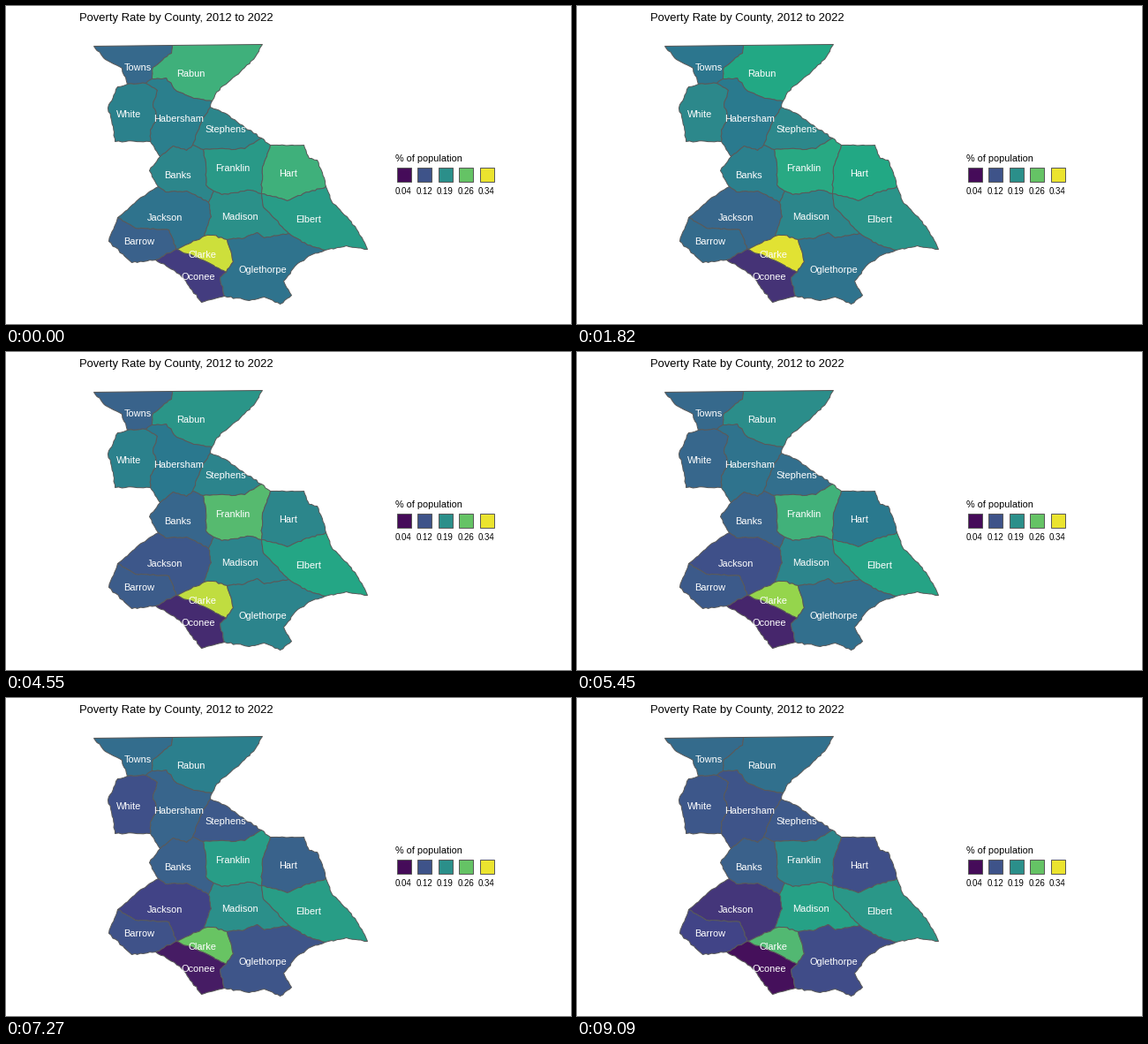
A matplotlib script for the animation above (10 s loop, 640 by 360 pixels).

```python
import numpy as np
import matplotlib.pyplot as plt
from matplotlib.animation import FuncAnimation
from matplotlib.patches import Polygon, Rectangle

W, H, DPI = 640, 360, 100
PX = 72 / DPI
LOOP, FRAMES, YEARS = 10000, 200, 11
EDGE = "#595959"
plt.rcParams["font.family"] = "Liberation Sans"
rng = np.random.default_rng(7)

# Colour scale: six viridis stops blended in Lab space
TO_XYZ = np.array([[.4124, .3576, .1805], [.2126, .7152, .0722], [.0193, .1192, .9505]])
WHITE = TO_XYZ.sum(axis=1)
STOPS = ["#440154", "#414487", "#2A788E", "#22A884", "#7AD151", "#FDE725"]


def to_lab(code):
    c = np.array([int(code[i:i + 2], 16) / 255 for i in (1, 3, 5)])
    lin = np.where(c > .04045, ((c + .055) / 1.055) ** 2.4, c / 12.92)
    t = TO_XYZ @ lin / WHITE
    f = np.where(t > .008856, np.cbrt(t), 7.787 * t + 16 / 116)
    return np.array([116 * f[1] - 16, 500 * (f[0] - f[1]), 200 * (f[1] - f[2])])


LAB = np.array([to_lab(s) for s in STOPS])


def shade(t):
    L, a, b = (np.interp(t, np.linspace(0, 1, 6), col) for col in LAB.T)
    fy = (L + 16) / 116
    f = np.array([fy + a / 500, fy, fy - b / 200])
    xyz = np.where(f > .2069, f ** 3, (f - 16 / 116) / 7.787) * WHITE
    lin = np.clip(np.linalg.solve(TO_XYZ, xyz), 0, 1)
    return np.clip(np.where(lin > .0031308, 1.055 * lin ** (1 / 2.4) - .055, 12.92 * lin), 0, 1)


# Points where borders meet
NODES = dict(
    a=(188, 44), b=(165, 82), c=(158, 87), d=(137, 88), e=(233, 107), f=(231, 114),
    g=(163, 153), h=(174, 170), i=(211, 157), j=(223, 162), k=(289, 149), l=(299, 157),
    m=(289, 212), n=(235, 209), o=(229, 222), p=(172, 204), q=(362, 204), r=(361, 276),
    s=(320, 257), t=(250, 264), u=(224, 260), v=(192, 275), w=(126, 239), x=(169, 287),
    y=(249, 301), z=(247, 328))
borders = {}


def border(sides, ends, *via):
    """Rough line between two nodes; sides are the areas it divides, digits mean outside."""
    pts = np.array([NODES[ends[0]], *via, NODES[ends[1]]], float)
    line = [pts[:1]]
    for p, q in zip(pts, pts[1:]):
        d = np.hypot(*(q - p))
        step = p + (q - p) * np.linspace(0, 1, max(2, round(d / 3.5) + 1))[1:, None]
        if d < 80:  # the long state line stays straight
            step[:-1] += rng.uniform(-.8, .8, step[:-1].shape)
        line.append(step)
    borders[sides] = ends, np.vstack(line)


border("T0", "da", (131, 70), (112, 60), (99, 45))
border("TR", "ab", (187, 53), (166, 69))
border("TH", "bc")
border("TW", "cd")
border("R0", "ae", (290, 43), (282, 57), (265, 74), (238, 97))
border("RH", "be", (181, 81), (193, 96), (212, 104))
border("W0", "dg", (126, 91), (115, 115), (121, 136), (123, 153))
border("WH", "cg", (171, 95), (166, 111), (171, 126), (163, 140))
border("H0", "gh")
border("H1", "ef")
border("HS", "fi", (222, 129))
border("HB", "hi", (189, 158), (204, 163))
border("SB", "ij")
border("S0", "fk", (250, 122), (270, 137))
border("SF", "jk", (270, 161))
border("B0", "hp", (162, 186))
border("BF", "jn", (226, 180), (226, 202))
border("BM", "no")
border("BJ", "po", (180, 210), (204, 209))
border("F0", "kl")
border("FN", "lm", (290, 182))
border("FM", "nm", (244, 213), (276, 208))
border("N0", "lq", (337, 157), (343, 172), (352, 174), (361, 198))
border("NE", "mq", (318, 220), (336, 212))
border("E0", "qr", (368, 220), (395, 249), (409, 275), (385, 271))
border("EM", "ms", (291, 227), (305, 241))
border("EG", "sr", (341, 270))
border("MG", "st", (292, 262), (284, 256), (270, 262))
border("MC", "tu", (234, 259))
border("JM", "ou", (232, 238))
border("JC", "uv", (206, 269))
border("J0", "pw", (150, 218))
border("JA", "wv", (146, 251), (184, 253))
border("A0", "wx", (116, 266), (142, 290))
border("AO", "xv")
border("CO", "vy", (222, 287))
border("CG", "ty", (257, 289))
border("OG", "yz", (242, 307))
border("O0", "xz", (196, 303), (221, 335))
border("G0", "zr", (275, 333), (292, 329), (310, 337), (323, 327), (314, 311),
       (330, 291), (346, 281))


def ring(area):
    todo = [b for sides, b in borders.items() if area in sides]
    (_, tip), pts = todo.pop(0)
    chain = [pts]
    while todo:
        ends, pts = todo.pop(next(i for i, b in enumerate(todo) if tip in b[0]))
        forward = ends[0] == tip
        tip = ends[1] if forward else ends[0]
        chain.append(pts if forward else pts[::-1])
    return np.vstack(chain) + .5


# area: name, label centre, then scale position (%) in the key years
KEY_YEARS = 0, 3, 5, 7, 10
COUNTIES = {
    "T": ("Towns", 149, 69, 34, 42, 32, 36, 35),
    "R": ("Rabun", 209, 76, 64, 58, 52, 46, 37),
    "W": ("White", 139, 122, 44, 48, 44, 23, 27),
    "H": ("Habersham", 196, 127, 43, 40, 40, 36, 26),
    "S": ("Stephens", 249, 139, 46, 47, 45, 28, 28),
    "B": ("Banks", 194, 191, 46, 42, 33, 31, 31),
    "F": ("Franklin", 257, 183, 54, 64, 69, 60, 46),
    "N": ("Hart", 320, 189, 64, 58, 46, 35, 24),
    "J": ("Jackson", 180, 239, 38, 31, 27, 22, 15),
    "M": ("Madison", 265, 238, 50, 44, 45, 46, 57),
    "E": ("Elbert", 343, 241, 55, 50, 59, 57, 53),
    "A": ("Barrow", 151, 266, 31, 37, 29, 28, 20),
    "C": ("Clarke", 222, 281, 92, 97, 90, 77, 68),
    "O": ("Oconee", 218, 306, 17, 12, 11, 8, 3),
    "G": ("Oglethorpe", 291, 298, 38, 38, 45, 28, 23),
}

fig = plt.figure(figsize=(W / DPI, H / DPI), dpi=DPI, facecolor="white")
ax = fig.add_axes([0, 0, 1, 1])
ax.set_xlim(0, W)
ax.set_ylim(H, 0)
ax.axis("off")


def label(x, y, s, px, color="black", ha="center"):
    ax.text(x, y, s, size=px * PX, color=color, ha=ha, va="baseline", zorder=5)


shapes = {}
for area, (name, x, y, *rates) in COUNTIES.items():
    shape = ax.add_patch(Polygon(ring(area), closed=True, ec=EDGE, lw=PX))
    shapes[shape] = rates
    label(x, y + 4, name, 11, "white")

label(83, 17, "Poverty Rate by County, 2012 to 2022", 13, ha="left")
label(441, 176, "% of population", 10.9, ha="left")
for i, rate in enumerate([.04, .12, .19, .26, .34]):
    x = 442 + int(23.5 * i)
    ax.add_patch(Rectangle((x + .5, 182.5), 16, 16, fc=shade(.02 + .2375 * i),
                           ec=EDGE, lw=PX))
    label(450.3 + 23.5 * i, 213, f"{rate:.2f}", 9.6)


def draw(i):
    year = min((i + 1) * YEARS // FRAMES, YEARS - 1)
    for shape, rates in shapes.items():
        shape.set_facecolor(shade(np.interp(year, KEY_YEARS, rates) / 100))
    return list(shapes)


anim = FuncAnimation(fig, draw, frames=FRAMES, interval=LOOP // FRAMES,
                     repeat=True, repeat_delay=0)
plt.show()
```
